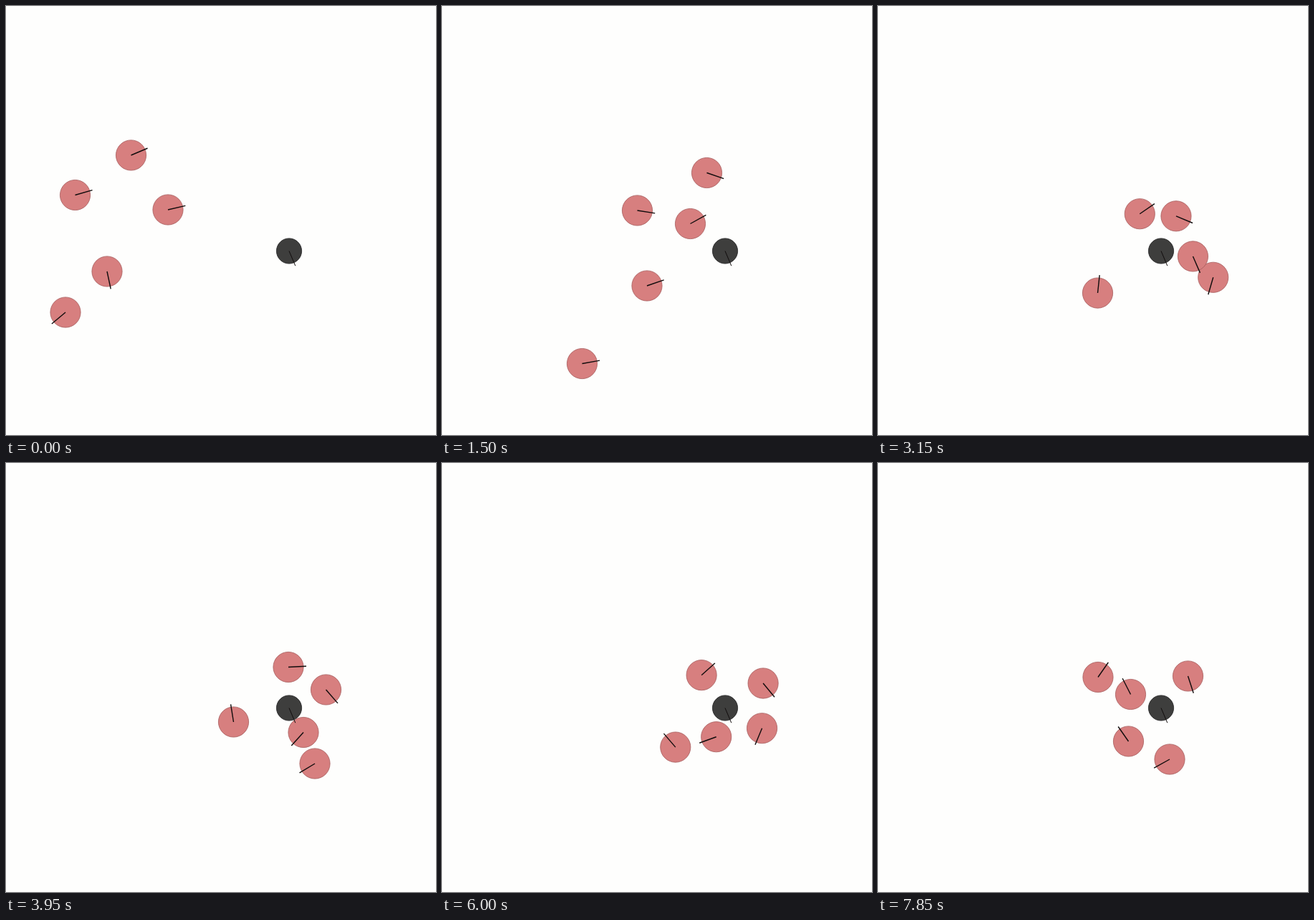
These frames come from a looping animation (600x598 px, 7.9 s). An HTML page with a canvas:

```html
<!DOCTYPE html>
<html lang="en">
<head>
<meta charset="utf-8">
<title>Robots circling a target</title>
<style>
  html, body { margin: 0; width: 100%; height: 100%; overflow: hidden; background: #fefefd; }
  canvas { display: block; width: 600px; height: 598px; }
</style>
</head>
<body>
<canvas id="stage" width="600" height="598"></canvas>
<script>
const LOOP = 7900, TICK = 50;
const RAD = Math.PI / 180;
const ctx = document.getElementById('stage').getContext('2d');

// Poses are [x, y, heading in degrees], one per entry of STEPS.
const STEPS = [0, 19, 37, 68, 92, 126, 146];
const POSES = [
  [[174.5, 208, -23], [369.5, 232.5, 19], [465.5, 316, 66], [431, 419, 149], [366.5, 432.5, 177], [306.5, 355.5, 256], [307, 298.5, 305]],
  [[96.5, 263.5, -16], [272.5, 285, 9], [418, 328, 5], [415, 375.5, 132], [396.5, 386, 107], [360, 361, 213], [352.5, 322.5, 243]],
  [[226, 284, -13], [346.5, 303.5, -29], [378.5, 281.5, -2], [446.5, 316, 49], [454, 336, 69], [413, 400.5, 156], [349.5, 388, 235]],
  [[141, 370, 78], [286, 390, -19], [339, 318, -64], [394, 284.5, -3], [422, 285.5, 17], [463, 351.5, 84], [407, 413, 151]],
  [[83, 427, 140], [195.5, 498.5, -10], [302, 436.5, -72], [317.5, 361, -99], [342, 319, -63], [391, 281, -20], [432.5, 297, 72]]
];

// Sharper turns between the poses: [step, x, y, heading].
const TURNS = [
  [[2, 192, 204.6, 0], [16, 331, 219.5, 18], [98, 350, 417, 212]],
  [],
  [[12, 350, 300, -8]],
  [[7, 180, 403, 0]],
  [[6, 71, 476, 68], [16, 155, 503.5, -3], [34, 297.5, 443, -64], [50, 305.5, 405, -82]]
];

function makeTrack(poses, turns) {
  const keys = poses.map((p, i) => [STEPS[i], ...p]).concat(turns)
    .map(([n, x, y, a]) => ({ n, x, y, a }))
    .sort((p, q) => p.n - q.n);
  const pace = (p, q) => Math.hypot(q.x - p.x, q.y - p.y) / (q.n - p.n);
  keys.forEach((k, i) => {
    const before = keys[i - 1], after = keys[i + 1];
    const into = before ? pace(before, k) : pace(k, after);
    const out = after ? pace(k, after) : into;
    const speed = (into + out) / 2;
    k.vx = speed * Math.cos(k.a * RAD);
    k.vy = speed * Math.sin(k.a * RAD);
  });
  return keys;
}

const tracks = POSES.map((p, i) => makeTrack(p, TURNS[i]));

// Cubic between two values with a given rate at each end.
function hermite(a, va, b, vb, s, span) {
  const r = 1 - s;
  return a * r * r * (1 + 2 * s) + b * s * s * (3 - 2 * s)
    + span * s * r * (va * r - vb * s);
}

function poseAt(keys, n) {
  let i = 0;
  while (i < keys.length - 2 && n >= keys[i + 1].n) i++;
  const p = keys[i], q = keys[i + 1];
  const span = q.n - p.n;
  const s = Math.min(1, (n - p.n) / span);
  return {
    x: hermite(p.x, p.vx, q.x, q.vx, s, span),
    y: hermite(p.y, p.vy, q.y, q.vy, s, span),
    a: p.a + (q.a - p.a) * s
  };
}

// The motion rests for a while after the first second.
function stepAt(ms) {
  if (ms < 100) return 0;
  if (ms < 950) return Math.floor(ms / TICK) - 1;
  if (ms < 1000) return 17;
  if (ms < 1500) return 18;
  return 19 + Math.floor((ms - 1500) / TICK);
}

function drawBody({ x, y, a }, radius, fill, edge, reach, weight) {
  ctx.beginPath();
  ctx.arc(x, y, radius, 0, 2 * Math.PI);
  ctx.fillStyle = fill;
  ctx.fill();
  ctx.lineWidth = 0.8;
  ctx.strokeStyle = edge;
  ctx.stroke();
  ctx.beginPath();
  ctx.moveTo(x, y);
  ctx.lineTo(x + reach * Math.cos(a * RAD), y + reach * Math.sin(a * RAD));
  ctx.lineWidth = weight;
  ctx.strokeStyle = '#100c0c';
  ctx.stroke();
}

const target = { x: 395, y: 341.5, a: 67 };
const start = performance.now();

function draw() {
  const n = stepAt((performance.now() - start) % LOOP);
  ctx.fillStyle = '#fefefd';
  ctx.fillRect(0, 0, 600, 598);
  for (const keys of tracks) {
    drawBody(poseAt(keys, n), 21.1, '#d77f7f', '#a65c5c', 25, 1.4);
  }
  drawBody(target, 17.6, '#3e3e3d', '#222222', 22.5, 1);
  requestAnimationFrame(draw);
}
draw();
</script>
</body>
</html>
```
